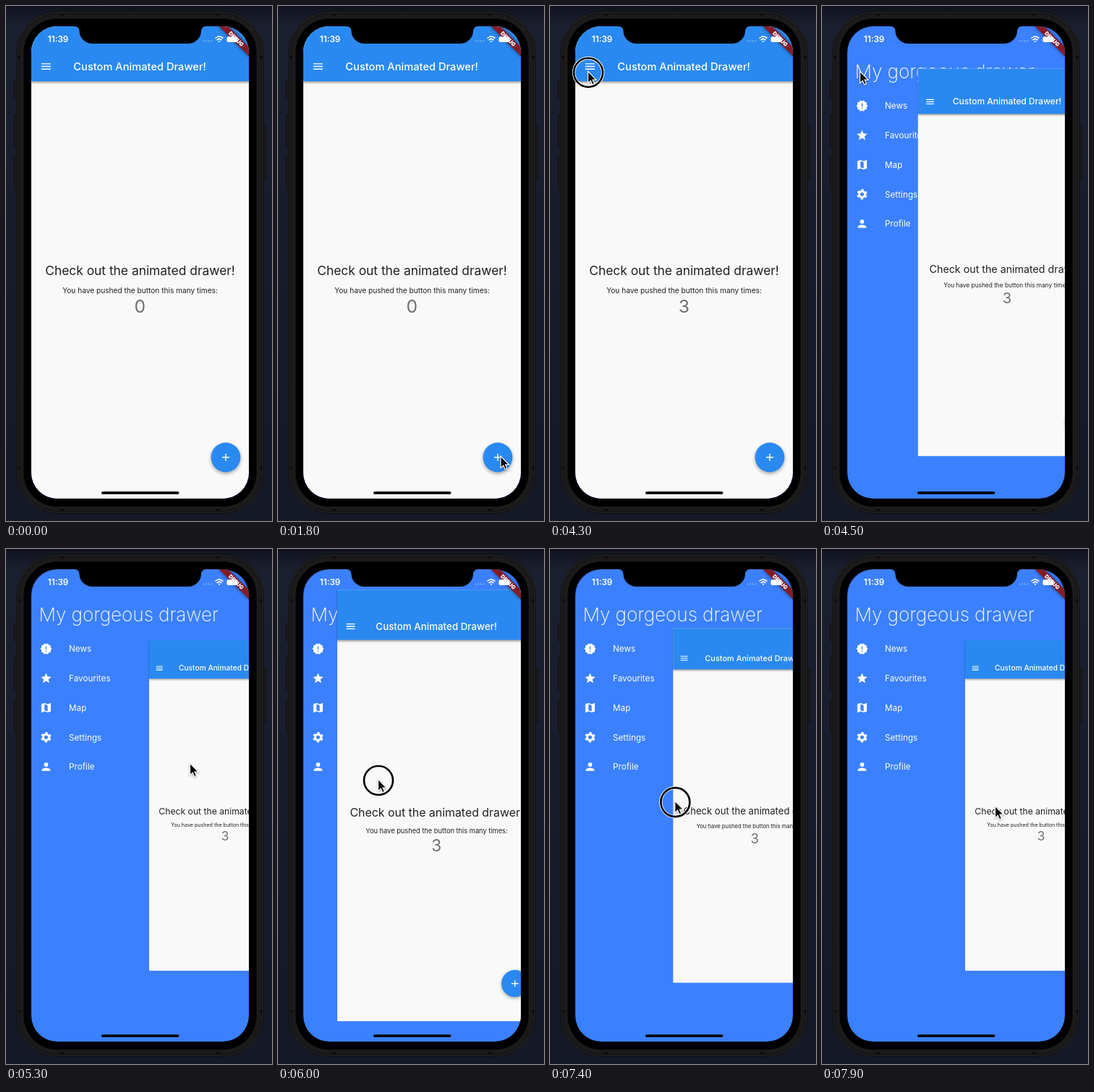
An HTML page that plays this animation: 368x712 px, repeating every 8 s.

```html
<!DOCTYPE html>
<html lang="en">
<head>
<meta charset="utf-8">
<title>Animated drawer</title>
<style>
html, body { margin: 0; width: 100%; height: 100%; overflow: hidden; background: #171b29; }
svg { display: block; width: 368px; height: 712px; }
text { font-family: Inter, Roboto, "Open Sans", sans-serif; fill: #fff; }
.mid { text-anchor: middle; }
#bar { filter: drop-shadow(0 2px 1.5px rgba(0,0,0,.38)); }
#fab { filter: drop-shadow(0 2.5px 2.5px rgba(0,0,0,.35)); }
#arrow { filter: drop-shadow(0 1px 1px rgba(0,0,0,.35)); }
#band { filter: drop-shadow(0 0 2.5px rgba(0,0,0,.6)); }
</style>
</head>
<body>
<svg viewBox="0 0 368 712">
  <defs>
    <linearGradient id="desk" x2="0" y2="1">
      <stop stop-color="#10131d"/><stop offset=".04" stop-color="#1b2031"/>
      <stop offset=".5" stop-color="#171b2a"/><stop offset="1" stop-color="#151926"/>
    </linearGradient>
    <clipPath id="screen"><rect x="35" y="28" width="301" height="653" rx="36"/></clipPath>
    <clipPath id="fabClip"><circle cx="304" cy="624" r="20.4"/></clipPath>
  </defs>
  <rect width="368" height="712" fill="url(#desk)"/>

  <!-- phone body -->
  <g fill="#1c1c1c" stroke="#0b0b0c" stroke-width=".8">
    <rect x="11.5" y="103" width="6" height="24" rx="1.5"/>
    <rect x="11.5" y="150.5" width="6" height="44" rx="1.5"/>
    <rect x="11.5" y="209" width="6" height="44.5" rx="1.5"/>
    <rect x="353" y="165" width="6" height="75.5" rx="1.5"/>
    <rect x="15" y="8" width="341" height="693" rx="55" fill="#242425"/>
    <rect x="17.5" y="10.5" width="336" height="688" rx="53" fill="#1b1b1c"/>
  </g>
  <g id="marks" fill="#0c0c0d"></g>
  <rect x="24.5" y="17.5" width="322" height="674.5" rx="46" fill="#000"/>

  <g clip-path="url(#screen)">
    <rect x="35" y="28" width="301" height="653" fill="#3b80ff"/>
    <text x="45.5" y="100" font-size="26.2" font-weight="200" letter-spacing="-.08">My gorgeous drawer</text>
    <g id="menu" fill="#fff" fill-rule="evenodd"></g>

    <g id="page">
      <rect x="35" y="28" width="301" height="653" fill="#f9f9f9"/>
      <rect id="bar" x="35" y="28" width="301" height="76" fill="#2a89f0"/>
      <path transform="translate(46.6 74.8) scale(.7275)" fill="#fff" d="M3 18h18v-2H3zm0-5h18v-2H3zm0-7v2h18V6z"/>
      <text class="mid" x="185.2" y="88.5" font-size="14.55" font-weight="500" letter-spacing=".05">Custom Animated Drawer!</text>
      <text class="mid" x="185.5" y="371.8" font-size="17.46" letter-spacing="-.03" style="fill:#212121">Check out the animated drawer!</text>
      <text class="mid" x="185.5" y="397" font-size="10.19" letter-spacing="-.02" style="fill:#212121">You have pushed the button this many times:</text>
      <text class="mid" id="count" x="185.3" y="423.8" font-size="24.7" style="fill:#707070">0</text>
      <circle id="fab" cx="304" cy="624" r="20.4" fill="#2a89f0"/>
      <circle id="ripple" cx="307.5" cy="624" fill="#fff" clip-path="url(#fabClip)"/>
      <path transform="translate(295.3 615.3) scale(.7275)" fill="#fff" d="M19 13h-6v6h-2v-6H5v-2h6V5h2v6h6z"/>
    </g>

    <!-- banner and status bar -->
    <g transform="translate(336 28) rotate(45)">
      <rect id="band" x="-30" y="20.4" width="60" height="8.7" fill="#861a25"/>
    </g>
    <text x="57.8" y="50.2" font-size="11.7" font-weight="600">11:39</text>
    <g id="dots" fill="#fff" opacity=".4"></g>
    <g fill="none" stroke="#fff" stroke-width="1.7">
      <path d="M289.6 44.6Q295 39.8 300.4 44.6M291.6 47Q295 44 298.4 47"/>
      <path d="M293.2 48.2h3.6L295 50.2z" fill="#fff" stroke="none"/>
    </g>
    <rect x="305.5" y="42.3" width="14.5" height="7.6" rx="2" fill="#fff"/>
    <rect x="320.7" y="44.7" width="1.2" height="2.8" rx=".6" fill="#fff" opacity=".7"/>
    <text class="mid" transform="translate(336 28) rotate(45)" y="27.4" font-size="7.4" font-weight="900">DEBUG</text>
    <rect x="132" y="671.2" width="107.5" height="3.8" rx="1.9" fill="#050508"/>
    <path d="M95 27V28A6.500 6.500 0 0 1 101.500 34.500A18 17.500 0 0 0 119.500 52H252A18 17.500 0 0 0 270 34.500A6.500 6.500 0 0 1 276.500 28V27Z"/>
  </g>

  <g id="pointer">
    <g id="ring" fill="none">
      <circle cx="1" cy="2" r="20" stroke="#fff" stroke-width="4.4"/>
      <circle cx="1" cy="2" r="20" stroke="#000" stroke-width="2.7"/>
    </g>
    <path id="arrow" d="M.5 .3V16.600L4.200 13.200 6.700 18.800 9.400 17.600 7 12.100H12Z" stroke="#fff" stroke-width="1.2"/>
  </g>
</svg>
<script>
const $ = id => document.getElementById(id);
const LOOP = 8000, STEP = 100, SLIDE = 163, LEFT = 35, MIDDLE = 354.5;
const clamp = v => Math.min(1, Math.max(0, v));

const items = [
  ["News", '<path d="M23 12l-2.44-2.78.34-3.68-3.61-.82-1.89-3.18L12 3 8.6 1.54 6.71 4.72l-3.61.81.34 3.68L1 12l2.44 2.78-.34 3.69 3.61.82 1.89 3.18L12 21l3.4 1.46 1.89-3.18 3.61-.82-.34-3.68zM13 17h-2v-2h2zm0-4h-2V7h2z"/>'],
  ["Favourites", '<path d="M12 17.27L18.18 21l-1.64-7.03L22 9.24l-7.19-.61L12 2 9.19 8.63 2 9.24l5.46 4.73L5.82 21z"/>'],
  ["Map", '<path d="M20.5 3L15 5.1 9 3 3.36 4.9Q3 5 3 5.4V20.5Q3 21 3.5 21L9 18.9l6 2.1 5.64-1.9Q21 19 21 18.6V3.5Q21 3 20.5 3zM15 19l-6-2.11V5l6 2.11z"/>'],
  ["Settings", '<g fill="none" stroke="#fff"><circle cx="12" cy="12" r="5.5" stroke-width="4"/><circle cx="12" cy="12" r="8.2" stroke-width="3.4" pathLength="12" stroke-dasharray="1" stroke-dashoffset="-.5"/></g>'],
  ["Profile", '<circle cx="12" cy="8" r="4"/><path d="M12 14c-2.67 0-8 1.34-8 4v2h16v-2c0-2.66-5.33-4-8-4z"/>']
];
$("menu").innerHTML = items.map(([label, icon], i) => {
  const y = 138 + i * 40.75;
  return `<g transform="translate(46.7 ${y - 8.7}) scale(.7275)">${icon}</g>
    <text x="87" y="${y + 4.4}" font-size="11.64" letter-spacing=".06">${label}</text>`;
}).join("");

const dot = (x, y, r) => `<circle cx="${x}" cy="${y}" r="${r}"/>`;
$("dots").innerHTML = [0, 1, 2, 3].map(i => dot(273.7 + i * 3.6, 48.5, 1)).join("");
$("marks").innerHTML = [[78, 12], [293, 12], [78, 697], [293, 697], [18, 71], [353, 71], [18, 639], [353, 639]]
  .map(([x, y]) => dot(x, y, 2)).join("");

// pointer stops: time, x, y
const stops = [
  [850, 376, 700], [1650, 307.5, 622], [3350, 307.5, 622], [4150, 52, 90], [4550, 52, 90],
  [5200, 254, 296], [5450, 254, 296], [6550, 22, 340], [6850, 37, 334], [7000, 37, 334], [7650, 239, 355]
];
const taps = [1900, 2250, 2600];
const presses = [...taps.map(t => [t, t + 120]), [4150, 4350], [5450, 6550], [7000, 7650]];

function pointerAt(t) {
  const i = stops.findIndex(s => s[0] > t);
  if (i < 0) return stops.at(-1).slice(1);
  if (!i) return stops[0].slice(1);
  const [a, b] = [stops[i - 1], stops[i]];
  const k = (t - a[0]) / (b[0] - a[0]), e = k * k * (3 - 2 * k);
  return [1, 2].map(n => a[n] + (b[n] - a[n]) * e);
}

function openness(t, x) {
  if (t < 5450) return clamp((t - 4350) / 250);
  return clamp((x - (t < 6850 ? 254 - SLIDE : 37)) / SLIDE);
}

function draw(t) {
  const [x, y] = pointerAt(t), p = openness(t, x);
  $("page").setAttribute("transform",
    `translate(${LEFT + SLIDE * p} ${MIDDLE}) scale(${1 - .3 * p}) translate(${-LEFT} ${-MIDDLE})`);
  $("pointer").setAttribute("transform", `translate(${x} ${y})`);
  $("ring").setAttribute("visibility", presses.some(([a, b]) => t >= a && t < b) ? "visible" : "hidden");
  $("count").textContent = taps.filter(s => t >= s + 120).length;

  const age = t - Math.max(-LOOP, ...taps.filter(s => t >= s));
  $("ripple").setAttribute("r", 4 + .04 * Math.min(age, 500));
  $("ripple").setAttribute("opacity", .2 * clamp((500 - age) / 300));
}

function frame(now) {
  draw(Math.floor(now % LOOP / STEP) * STEP);
  requestAnimationFrame(frame);
}
requestAnimationFrame(frame);
</script>
</body>
</html>
```
